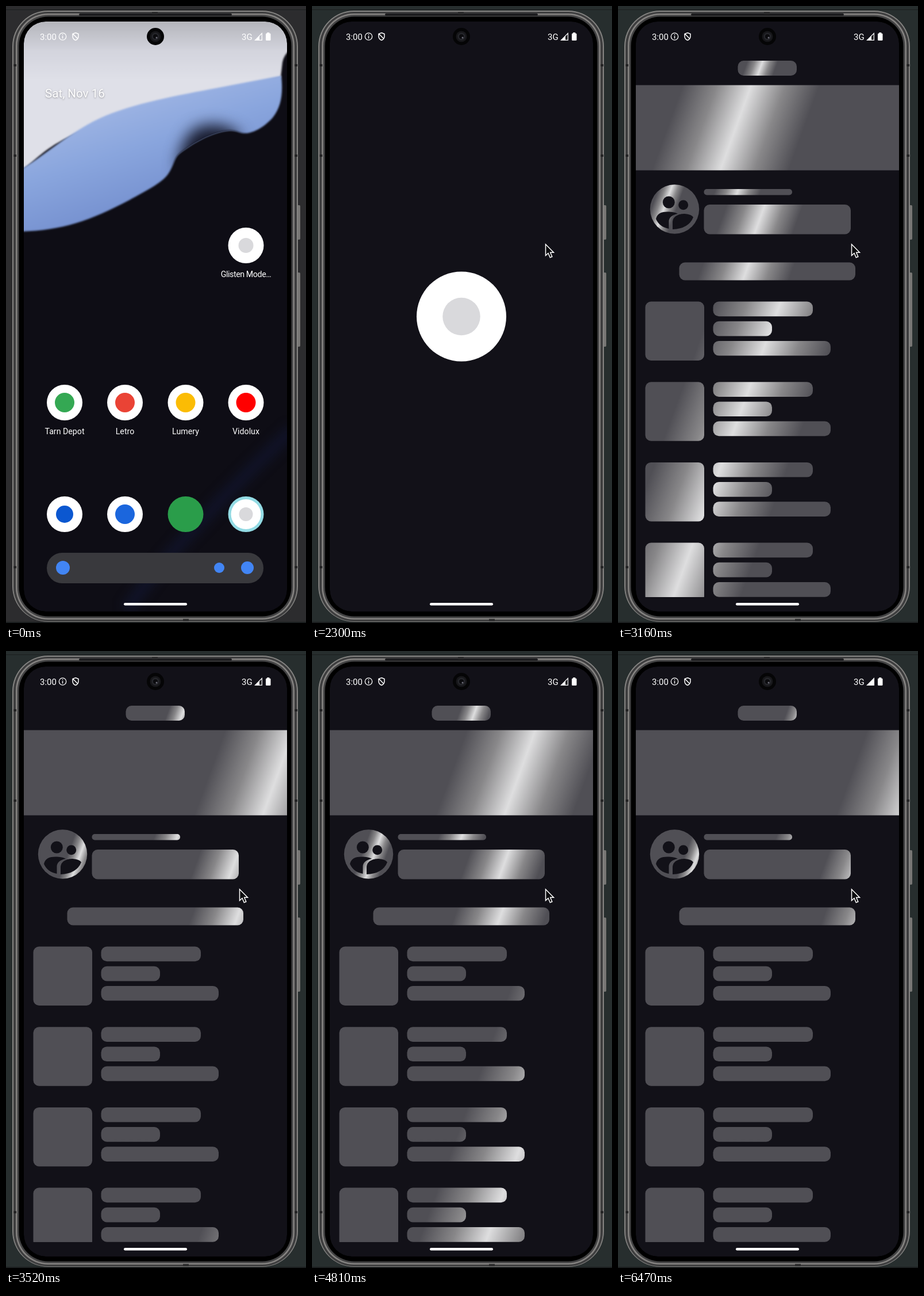
Recreate the animation shown at these times as an HTML page with a canvas. Size 522x1072 px, loop 6520 ms.

```html
<!DOCTYPE html>
<html lang="en">
<head>
<meta charset="utf-8">
<title>Skeleton loading</title>
<style>
html, body { margin: 0; width: 100%; height: 100%; overflow: hidden; background: #272e2e; }
canvas { display: block; width: 522px; height: 1072px; }
</style>
</head>
<body>
<canvas id="stage" width="522" height="1072"></canvas>
<script>
const W = 522, H = 1072, LOOP = 6520;
const SCREEN = { x: 31, y: 27, w: 458, h: 1025, r: 38 };
const APP_BG = '#121118', WHITE = '#fff', BONE = '#504f55';
const LAUNCH = 1800, MOUNT = 2517, SHIMMER_MS = 1440;
const stage = document.getElementById('stage').getContext('2d');
let ctx = stage;

const clamp = v => Math.max(0, Math.min(1, v));
const mix = (a, b, p) => a + (b - a) * p;
const easeOut = p => 1 - (1 - p) ** 3;

function box(x, y, w, h, r, fill) {
  ctx.beginPath();
  ctx.roundRect(x, y, w, h, r);
  if (fill) { ctx.fillStyle = fill; ctx.fill(); }
}
function disc(x, y, r, fill) {
  ctx.beginPath();
  ctx.arc(x, y, r, 0, 7);
  ctx.fillStyle = fill;
  ctx.fill();
}
function shape(d, fill, stroke, width = 1) {
  const path = new Path2D(d);
  if (fill) { ctx.fillStyle = fill; ctx.fill(path); }
  if (stroke) { ctx.strokeStyle = stroke; ctx.lineWidth = width; ctx.stroke(path); }
}
function text(str, x, y, size, align = 'left', spacing = 0) {
  ctx.font = `${size}px Roboto, sans-serif`;
  ctx.textAlign = align;
  ctx.letterSpacing = spacing + 'px';
  ctx.fillStyle = WHITE;
  ctx.fillText(str, x, y);
}
function fade(x0, y0, x1, y1, ...colors) {
  const g = ctx.createLinearGradient(x0, y0, x1, y1);
  colors.forEach((c, i) => g.addColorStop(i / (colors.length - 1), c));
  return g;
}
function clipScreen() {
  box(SCREEN.x, SCREEN.y, SCREEN.w, SCREEN.h, SCREEN.r);
  ctx.clip();
}

// Static layers are painted once.
function layer(paint) {
  const canvas = document.createElement('canvas');
  canvas.width = W;
  canvas.height = H;
  ctx = canvas.getContext('2d');
  paint();
  ctx = stage;
  return canvas;
}

const phone = layer(() => {
  box(507, 346, 5, 60, 2, '#777674');
  box(507, 463, 5, 129, 2, '#777674');
  const rings = [
    [11, 8, 497, 1062, 62, '#858482'], [13, 10, 493, 1059, 60, '#3d3d3e'],
    [17, 13, 485, 1053, 56, '#858381'], [19.5, 15.5, 480, 1048, 54, '#434344'],
    [22.5, 18.5, 474, 1042, 51, '#000']
  ];
  rings.forEach(r => box(...r));
  box(127, 13, 266, 4, 2, '#1c1c1e');
  for (const y of [103, 260, 975]) {
    box(13, y - 2, 5, 4, 0, '#242425');
    box(502, y - 2, 5, 4, 0, '#242425');
  }
  box(254, 10, 10, 4, 0, '#2b2b2c');
  box(308, 1065, 10, 4, 0, '#2b2b2c');
});

const home = layer(() => {
  clipScreen();
  ctx.fillStyle = '#0e0d15';
  ctx.fillRect(0, 0, W, H);
  ctx.filter = 'blur(9px)';
  shape('M500 735 Q410 820 330 905 T210 1050', null, 'rgba(20,28,66,.4)', 24);

  ctx.filter = 'blur(1.5px)';
  shape('M20 10 H500 V72 Q484 82 481 98 L478 124 C400 145 240 175 150 210 S60 265 20 290 Z',
    fade(0, 27, 0, 130, '#b4b5bb', '#d3d4dd', '#dfe0e8'));
  const blue = 'M20 288 C75 255 120 210 185 186 C250 162 330 150 390 138 L479 121 ' +
    'C482 150 480 174 464 194 C451 209 430 222 415 221 C403 220 399 214 382 217 ' +
    'C350 222 320 242 302 256 C292 264 293 276 282 292 C271 308 240 323 215 337 ' +
    'C145 374 95 391 20 392 Z';
  shape(blue, fade(180, 150, 245, 350, '#a3b8e5', '#89a5dd', '#7590cf'));
  ctx.save();
  ctx.clip(new Path2D(blue));
  ctx.filter = 'blur(13px)';
  shape('M298 285 C303 230 325 208 350 207 C375 204 391 212 410 224 L360 275 Z', '#171a2c');
  ctx.restore();
  ctx.filter = 'none';

  ctx.shadowColor = 'rgba(0,0,0,.35)';
  ctx.shadowBlur = 3;
  ctx.shadowOffsetY = 1;
  text('Sat, Nov 16', 68, 159, 20.6);
  ctx.shadowColor = 'transparent';

  const columns = [102, 207, 312.5, 417.5];
  const tile = (x, y, color, r = 15) => { disc(x, y, 31, WHITE); disc(x, y, r, color); };
  tile(417.5, 416, '#d9d9dc', 13);
  text('Glisten Mode…', 417.5, 471, 14.2, 'center', -.4);
  [['Tarn Depot', '#34a853'], ['Letro', '#ea4335'], ['Lumery', '#fbbc04'], ['Vidolux', '#f00']]
    .forEach(([label, color], i) => {
      tile(columns[i], 689, color, 17);
      text(label, columns[i], 744, 14.2, 'center');
    });
  tile(columns[0], 883, '#0b57d0');
  tile(columns[1], 883, '#1b66dd', 17);
  disc(columns[2], 883, 31, '#2a9d4a');
  disc(columns[3], 883, 31, '#93dbe4');
  disc(columns[3], 883, 26, WHITE);
  disc(columns[3], 883, 12, '#d9d9dc');
  box(71, 950, 377, 53, 26.5, '#39393d');
  disc(99, 976, 12, '#4285f4');
  disc(371, 976, 9, '#4285f4');
  disc(420, 976, 11, '#4285f4');
});

function statusBar(t) {
  text('3:00', 59, 58.5, 15);
  ctx.beginPath();
  ctx.arc(98.5, 53, 6.2, 0, 7);
  ctx.strokeStyle = WHITE;
  ctx.lineWidth = 1.3;
  ctx.stroke();
  shape('M98.5 49 V50.6 M98.5 52 V56.5', null, WHITE, 1.4);
  shape('M121 46.5 L126 48.5 V52.5 Q126 57.5 121 59.5 Q116 57.5 116 52.5 V48.5 Z M116 48 L125 57', null, WHITE, 1.5);
  text('3G', 410, 58.5, 15);
  if (t < 5100) {
    shape('M445.3 47.5 V59.3 H433.5 Z', null, WHITE, 1.2);
    shape('M441 52 V59.5 H433 Z', WHITE);
  } else {
    shape('M446 46 V60 H432 Z', WHITE);
  }
  box(452, 47.5, 8.5, 12.5, 1.5, WHITE);
  box(454.2, 46, 4, 3, .5, WHITE);

  disc(260, 53, 15, '#050506');
  disc(260, 53, 9.5, '#17171a');
  disc(260, 53, 6.5, '#25262b');
  disc(260, 53, 4, '#0b0b0e');
  disc(262, 55, 1.5, '#6d6d78');
  box(205, 1037, 110, 4.5, 2.2, WHITE);
}

// A 20° slanted highlight whose centre line passes through (x, y).
function shimmer(x, y, halfWidth) {
  const a = Math.PI / 9, k = halfWidth * Math.cos(a);
  const dx = k * Math.cos(a), dy = k * Math.sin(a);
  return fade(x - dx, y - dy, x + dx, y + dy, BONE, '#888789', '#dededf', '#888789', BONE);
}

function skeleton(t) {
  const local = (t - MOUNT) % SHIMMER_MS / 1000;
  const sweep = 1.63 * local - .67;
  const swept = (x, y, w, h, lag = 0) =>
    shimmer(x + w * (sweep - lag), y + h / 2, w * .26);
  const bone = (x, y, w, h, r) => box(x, y, w, h, r, swept(x, y, w, h));

  const appear = clamp((t - 2720) / 210);
  ctx.save();
  ctx.globalAlpha = appear;
  ctx.translate(0, 16 * (1 - appear) ** 2);
  bone(208.5, 95, 102.5, 26, 10);
  bone(31, 137.5, 458, 148, 0);
  bone(149.5, 318, 153.5, 10.5, 5);
  bone(149.5, 345, 255.5, 51.5, 10);
  bone(106.5, 445.5, 306.5, 31, 10);

  disc(98.5, 353, 42.7, swept(56, 310, 85, 85, .1));
  ctx.globalAlpha = 1;
  disc(88.3, 341, 10.5, APP_BG);
  disc(113.7, 345.7, 8.5, APP_BG);
  shape('M66 370 C68 359 78 357 89 357.5 Q100 358 104 361 Q89 364 88.5 374 V387 Q72 384 66 370 Z', APP_BG);
  shape('M95 388 V375 C96 364 107 361 116 361 Q128 362 131 367 Q123 387 95 388 Z', APP_BG);

  // One highlight runs across the whole list.
  const listPaint = shimmer(980 * local - 348, 514, 117);
  ctx.beginPath();
  ctx.rect(31, 490, 458, 537);
  ctx.clip();
  for (let i = 0; i < 4; i++) {
    const y = 513.5 + 139.7 * i;
    ctx.globalAlpha = clamp((t - 2760 - 60 * i) / 210);
    box(47.5, y, 102.5, 102.5, 10, listPaint);
    [173.5, 102.5, 204.5].forEach((w, j) => box(165.5, y + 34.2 * j, w, 25.7, 10, listPaint));
  }
  ctx.restore();
}

function appWindow(t) {
  const p = easeOut(clamp((t - LAUNCH) / 380));
  const x = mix(386.5, SCREEN.x, p), y = mix(385, SCREEN.y, p);
  const w = mix(62, SCREEN.w, p), h = mix(62, SCREEN.h, p);
  ctx.save();
  box(x, y, w, h, mix(31, SCREEN.r, p), APP_BG);
  ctx.clip();
  ctx.globalAlpha = clamp((2500 - t) / 120);
  const r = mix(31, 78, p);
  disc(x + w / 2, y + h / 2, r, WHITE);
  disc(x + w / 2, y + h / 2, r * .42, '#d9d9dc');
  ctx.restore();
  if (t > MOUNT) skeleton(t);
}

function cursor(t) {
  if (t < 900) return;
  const arrive = easeOut(clamp((t - 900) / 350));
  ctx.save();
  ctx.translate(mix(411, 405.5, clamp((t - 1560) / 90)), mix(1080, 413, arrive));
  shape('M1 1 V20.5 L5.5 16.5 L8.8 24 L12.3 22.5 L9.2 15.2 H15 Z', '#0c0c0e', WHITE, 1.5);
  ctx.restore();
}

function draw() {
  const t = performance.now() % LOOP;
  ctx.fillStyle = t < 570 ? '#2c2c2e' : '#272e2e';
  ctx.fillRect(0, 0, W, H);
  ctx.fillStyle = '#1b1e1f';
  ctx.fillRect(0, 6, W, 1);
  ctx.fillRect(0, 1070, W, 2);
  ctx.drawImage(phone, 0, 0);
  ctx.save();
  clipScreen();
  if (t < 2200) ctx.drawImage(home, 0, 0);
  if (t >= LAUNCH) appWindow(t);
  statusBar(t);
  cursor(t);
  ctx.restore();
  requestAnimationFrame(draw);
}
draw();
</script>
</body>
</html>
```
